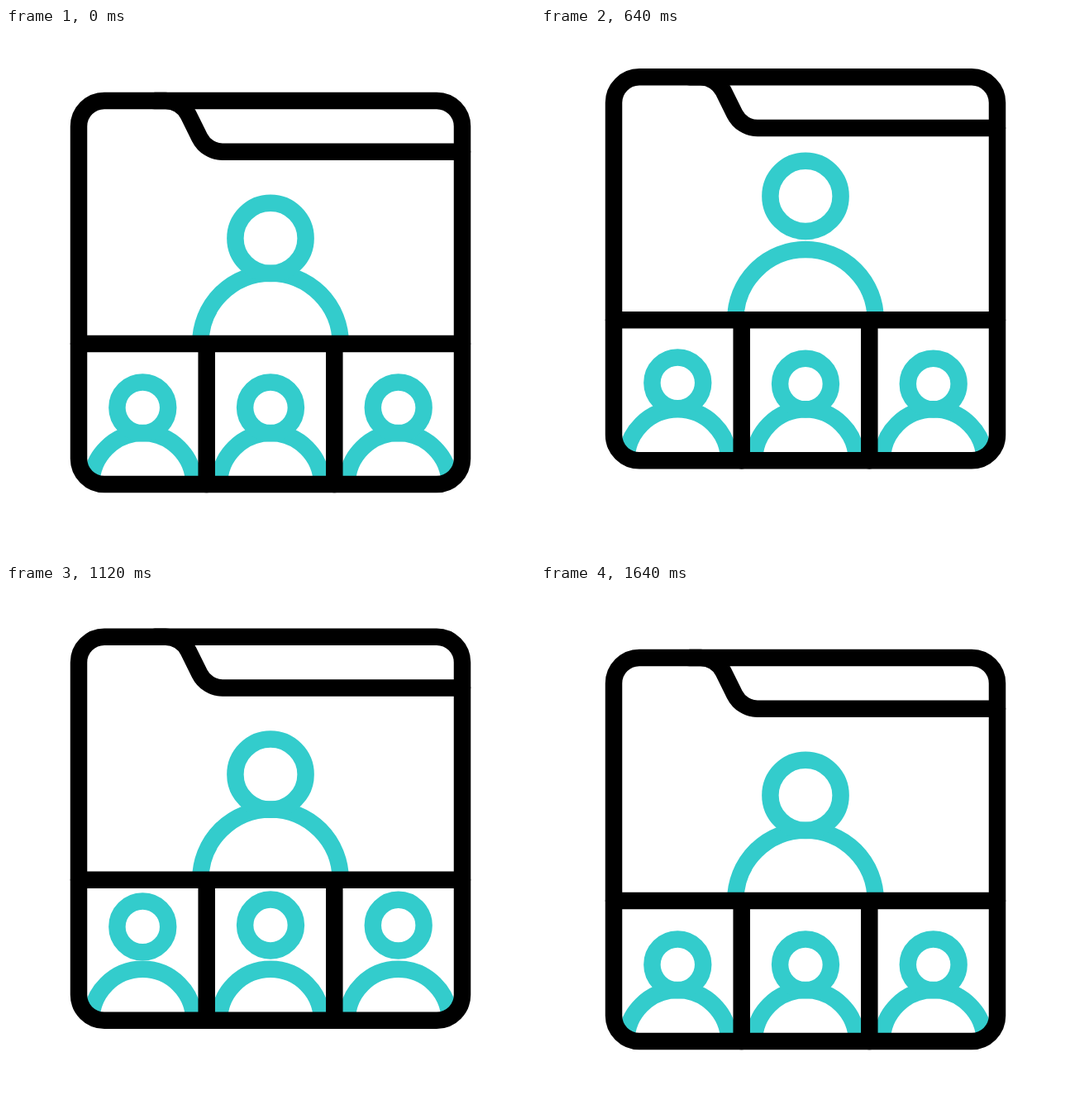
An HTML page that plays this animation: 640 by 640 pixels, repeating every 1720 ms.

```html
<!DOCTYPE html>
<html lang="en">
<head>
<meta charset="utf-8">
<title>Video meeting</title>
<style>
  html, body { margin: 0; height: 100%; overflow: hidden; background: #fff; }
  svg { display: block; width: 100vw; height: 100vh; fill: none; stroke-width: 20.5; }
</style>
</head>
<body>
<svg viewBox="0 0 640 640">
  <g id="window">
    <g id="people" stroke="#3cc"></g>
    <g stroke="#000" stroke-linecap="round">
      <rect x="88" y="88" width="464" height="464" rx="31"/>
      <path d="M180 88H193A31 31 0 0 1 220.7 105.1L234.3 132.6A31 31 0 0 0 262 149.7H552"/>
      <path d="M88 382H552M242.7 382V552M397.3 382V552"/>
    </g>
  </g>
</svg>
<script>
const LOOP = 1720, STEP = 40, EASE = 0.54;
const frame = document.getElementById('window');
const people = document.getElementById('people');

// Symmetric cubic-bezier(EASE, 0, 1 - EASE, 1), solved by bisection
function ease(x) {
  if (x <= 0) return 0;
  if (x >= 1) return 1;
  let lo = 0, hi = 1, s;
  for (let i = 0; i < 24; i++) {
    s = (lo + hi) / 2;
    const r = 1 - s;
    if (3 * r * r * s * EASE + 3 * r * s * s * (1 - EASE) + s ** 3 < x) lo = s;
    else hi = s;
  }
  return s * s * (3 - 2 * s);
}

// Rises from start to peak, falls back to zero at end
const pulse = (t, start, peak, end) => t < peak
  ? ease((t - start) / (peak - start))
  : 1 - ease((t - peak) / (end - peak));

function add(tag, attrs) {
  const el = document.createElementNS('http://www.w3.org/2000/svg', tag);
  for (const key in attrs) el.setAttribute(key, attrs[key]);
  return people.appendChild(el);
}

function person(cx, headY, headR, baseY, bodyR, lift, start, half) {
  add('path', { d: `M${cx - bodyR} ${baseY}a${bodyR} ${bodyR} 0 0 1 ${2 * bodyR} 0` });
  const head = add('circle', { cx, cy: headY, r: headR });
  return t => head.setAttribute('cy',
    headY - lift * pulse(t, start, start + half, start + 2 * half));
}

const heads = [
  person(320, 254.4, 42.6, 381.5, 84.7, 28.5, 45, 440),
  ...[0, 1, 2].map(i =>
    person(165.3 + i * 154.7, 459.3, 30.9, 552, 62, 22.7, 550 + i * 80, 458))
];

function draw(t) {
  frame.setAttribute('transform', `translate(0 ${-32 * pulse(t, 45, 848, 1628)})`);
  heads.forEach(move => move(t));
}

const origin = performance.now();
function tick() {
  const t = (performance.now() - origin) % LOOP;
  draw(Math.floor(t / STEP) * STEP);
  requestAnimationFrame(tick);
}
tick();
</script>
</body>
</html>
```
